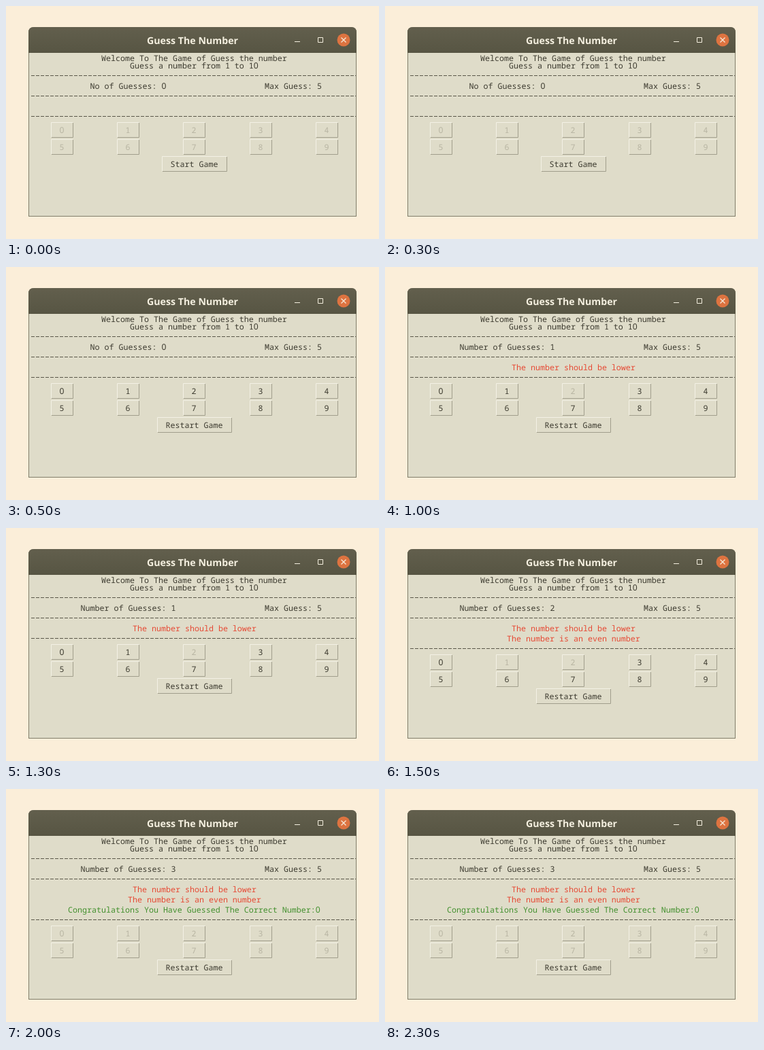
An HTML page that plays this animation: 548x343 px, repeating every 2.5 s.

```html
<!DOCTYPE html>
<html lang="en">
<head>
<meta charset="utf-8">
<title>Guess The Number</title>
<style>
html, body { margin: 0; width: 100%; height: 100%; overflow: hidden; background: #fbeed9; }
svg { display: block; }
text { font: 11.667px "Noto Sans Mono", monospace; white-space: pre; text-rendering: geometricPrecision; }
.zero { font: 12.2px "Noto Sans", sans-serif; }
.title { font: bold 14.2px "Open Sans", sans-serif; fill: #f4efdf; }
.rule { stroke: #5b584a; stroke-dasharray: 5 2; }
</style>
</head>
<body>
<svg width="548" height="343" viewBox="0 0 548 343">
  <defs>
    <linearGradient id="bar" x2="0" y2="1">
      <stop offset="0" stop-color="#625f4d"/>
      <stop offset="1" stop-color="#575543"/>
    </linearGradient>
  </defs>
  <path d="M33 310V39q0-8 8-8H507q8 0 8 8V310z" fill="#807e6b"/>
  <path d="M34 69H514V309H34z" fill="#dfdcc9"/>
  <path d="M33 69V39q0-8 8-8H507q8 0 8 8V69z" fill="url(#bar)"/>
  <text class="title" x="274" y="56" text-anchor="middle">Guess The Number</text>
  <path d="M424 52.5h8M458.5 46.5h7v7h-7z" fill="none" stroke="#f4efdf"/>
  <circle cx="496" cy="50" r="9.5" fill="#dd7340"/>
  <path d="M492.5 46.5l7 7m0-7l-7 7" stroke="#f6e8d8" stroke-width="1.3"/>
  <g id="view"></g>
</svg>
<script>
const INK = '#3d3b30', OFF = '#b8b5a3', RED = '#e64a35', GREEN = '#43902f';
const COLS = [66, 163, 260, 358, 455];
const STEP = 500;
const HINTS = [
  ['The number should be lower', 277, RED],
  ['The number is an even number', 277, RED],
  ['Congratulations You Have Guessed The Correct Number:0', 276.5, GREEN]
];
const steps = [
  { count: 'No of Guesses: 0', hints: 0, off: '0123456789', action: 'Start Game' },
  { count: 'No of Guesses: 0', hints: 0, off: '', action: 'Restart Game' },
  { count: 'Number of Guesses: 1', hints: 1, off: '2', action: 'Restart Game' },
  { count: 'Number of Guesses: 2', hints: 2, off: '12', action: 'Restart Game' },
  { count: 'Number of Guesses: 3', hints: 3, off: '0123456789', action: 'Restart Game' }
];

// Text on a 7px character grid, centred on cx.
const label = (s, cx, y, color = INK) =>
  `<text x="${cx - s.length * 3.5}" y="${y}" fill="${color}">` +
  s.replace(/0/g, '<tspan class="zero">0</tspan>') + '</text>';

const rule = y => `<path class="rule" d="M37 ${y + 0.5}H514"/>`;

const button = (s, x, y, w, color) =>
  `<path d="M${x + 0.5} ${y + 22}v-21.5h${w - 1}" fill="none" stroke="#f3f1e5"/>` +
  `<path d="M${x + 1} ${y + 22.5}h${w - 1.5}v-21.5" fill="none" stroke="#a19e8c"/>` +
  label(s, x + w / 2 - 0.5, y + 16, color);

function draw({ count, hints, off, action }) {
  const top = 162 + 15 * Math.max(0, hints - 1);
  const wide = action.length * 7 + 26;
  let out = label('Welcome To The Game of Guess the number', 276.5, 81) +
    label('Guess a number from 1 to 10', 276.5, 92) +
    label(count, 179.5, 122) + label('Max Guess: 5', 422, 122) +
    [102, 132, top].map(rule).join('');
  HINTS.slice(0, hints).forEach(([s, cx, color], i) => {
    out += label(s, cx, 152 + 15 * i, color);
  });
  for (let n = 0; n < 10; n++) {
    const y = top + 9 + 25 * Math.floor(n / 5);
    out += button(String(n), COLS[n % 5], y, 33, off.includes(n) ? OFF : INK);
  }
  return out + button(action, Math.floor(277.5 - wide / 2), top + 59, wide, INK);
}

const view = document.getElementById('view');
const start = performance.now();
let shown = -1;
function tick() {
  const i = Math.floor((performance.now() - start) / STEP) % steps.length;
  if (i !== shown) view.innerHTML = draw(steps[shown = i]);
  requestAnimationFrame(tick);
}
tick();
</script>
</body>
</html>
```
